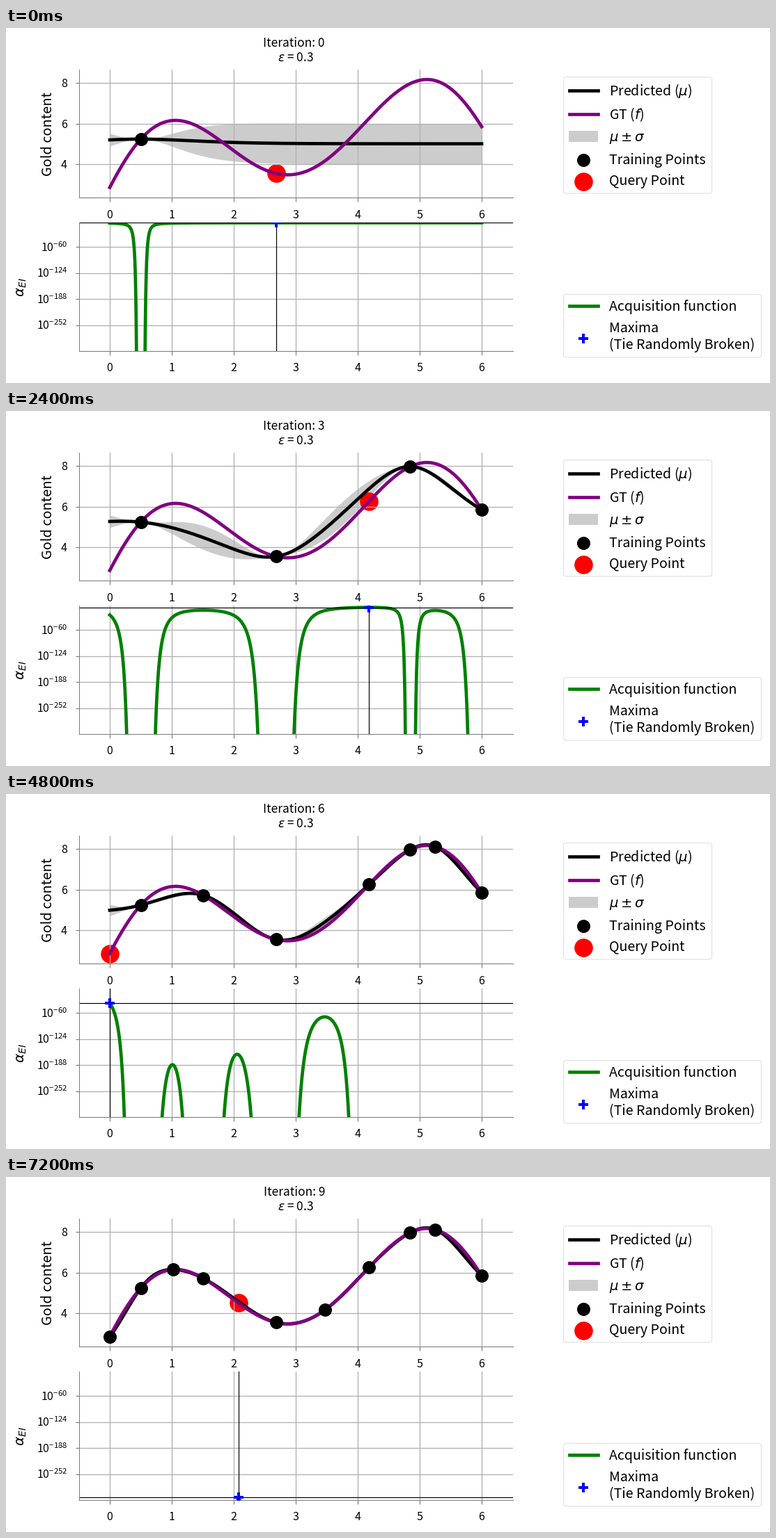
A matplotlib script for the animation above (8 s loop, 1097 by 511 pixels).

```python
import math

import numpy as np
import matplotlib.pyplot as plt
from matplotlib.animation import FuncAnimation
from matplotlib.patches import FancyBboxPatch, Rectangle

W, H, DPI = 1097, 511, 72  # at 72 dpi one point is one pixel
plt.rcParams.update({
    "font.family": ["Noto Sans CJK JP", "DejaVu Sans"],
    "mathtext.fontset": "dejavusans",
    "axes.unicode_minus": False,
})

PRIOR_MEAN, EPS = 5.0, 0.3
START = 0.5
QUERIES = [2.685, 6.0, 4.848, 4.18, 1.506, 5.247, 0.0, 3.472, 1.022, 2.073]

# Smooth ground truth fitted through a few known values
KNOTS = np.array([
    (0, 2.84), (0.5, 5.246), (1.022, 6.138), (1.07, 6.15), (1.506, 5.723),
    (2.073, 4.509), (2.685, 3.524), (2.88, 3.475), (3.472, 4.142),
    (4.18, 6.258), (4.848, 7.974), (5.12, 8.17), (5.247, 8.125), (6, 5.847),
])
truth = np.poly1d(np.polyfit(KNOTS[:, 0], KNOTS[:, 1], 6))
grid = np.linspace(0, 6, 1201)


def matern(a, b):
    s = math.sqrt(5) * np.abs(np.subtract.outer(a, b))
    return (1 + s + s ** 2 / 3) * np.exp(-s)


def predict(train, x):
    """Posterior mean and spread (variance) of the process at x."""
    cross = matern(train, x)
    weights = np.linalg.solve(matern(train, train), cross)
    mean = PRIOR_MEAN + weights.T @ (truth(train) - PRIOR_MEAN)
    spread = 1 - np.sum(cross * weights, axis=0)
    return mean, np.maximum(spread, 1e-6)


def log_tail(z):
    """log10 of pdf(z) + z * cdf(z), stable for very negative z."""
    log_pdf = -z * z / 2 - 0.5 * math.log(2 * math.pi)
    if z < -6:
        q = 1 / (z * z)
        rest = math.log(q * (1 - 3 * q + 15 * q ** 2 - 105 * q ** 3))
        return (log_pdf + rest) / math.log(10)
    cdf = 0.5 * math.erfc(-z / math.sqrt(2))
    return math.log10(math.exp(log_pdf) + z * cdf)


def log_improvement(train, x):
    mean, spread = predict(train, x)
    z = (mean - truth(train).max() - EPS) / spread
    log_ei = np.log10(spread) + np.array([log_tail(v) for v in z])
    return np.maximum(log_ei, -3000)


fig = plt.figure(figsize=((W + 0.01) / DPI, (H + 0.01) / DPI), dpi=DPI,
                 facecolor="white")

# Page layer in pixel coordinates, y pointing down
page = fig.add_axes([0, 0, 1, 1])
page.set(xlim=(0, W), ylim=(H, 0))
page.axis("off")


def label(x, y, text, size, ha="left", **kw):
    return page.text(x, y, text, fontsize=size, ha=ha, va="baseline", **kw)


def panel(top, height, ylim, yticks):
    left, width = 104.5, 623
    ax = fig.add_axes([left / W, 1 - (top + height) / H, width / W, height / H])
    ax.set(xlim=(-0.5, 6.5), ylim=ylim, xticks=range(7), yticks=yticks)
    ax.patch.set_visible(False)
    ax.grid(color="#b0b0b0", lw=1.3)
    ax.tick_params(length=5.5, width=1.2, color="gray",
                   labelleft=False, labelbottom=False)
    ax.spines[["top", "right"]].set_visible(False)
    for side in ("left", "bottom"):
        ax.spines[side].set(color="gray", linewidth=1.1)
    for i in range(7):
        label(149 + 89 * i, top + height + 29.3, str(i), 16, "center")
    return ax


top_ax = panel(59.7, 184.5, (2.34, 8.67), [4, 6, 8])
low_ax = panel(280, 185, (-315.2, 0), [-252, -188, -124, -60])

for v, y in zip((8, 6, 4), (85, 143.5, 201.8)):
    label(88, y, str(v), 16, "right")
for i in range(4):
    exponent = 60 + 64 * i
    label(88, 321.6 + 37.55 * i,
          rf"$\mathdefault{{10^{{-{exponent}}}}}$", 16, "right")

side = dict(rotation=90, rotation_mode="anchor")
label(66, 152.5, "Gold content", 20, "center", **side)
label(27, 373, r"$\alpha_{EI}$", 20, "center", **side)
title = label(413.7, 27.3, "", 17.3, "center")
label(415.7, 48, r"$\varepsilon$ = 0.3", 17.3, "center")


# Legends
LINE, DOT, BIG, PLUS = 4.7, 19, 26.6, 13.6


def legend_box(x, y, w, h):
    page.add_patch(FancyBboxPatch(
        (x, y), w, h, boxstyle="round,pad=0,rounding_size=4",
        fc="white", ec="#e4e4e4", lw=1.3))


def legend_line(y, color):
    page.plot([808.5, 849.5], [y, y], color=color, lw=LINE)


def legend_marker(y, marker, color, size):
    page.plot(828.7, y, marker, color=color, ms=size, mew=0)


legend_box(800.5, 70.5, 213, 167.5)
legend_line(89.7, "black")
legend_line(124, "purple")
page.add_patch(Rectangle((808, 148.5), 42, 15.5, fc="#cccccc", lw=0))
legend_marker(190.2, "o", "black", DOT)
legend_marker(220.7, "o", "red", BIG)

legend_box(800.5, 383.5, 284, 90.5)
legend_line(400.3, "green")
legend_marker(446.6, "P", "blue", PLUS)

for y, text in (
    (96.7, r"Predicted ($\mu$)"), (131, "GT ($f$)"),
    (163, r"$\mu \pm \sigma$"), (195.8, "Training Points"),
    (226.2, "Query Point"), (407.2, "Acquisition function"),
    (438.2, "Maxima"), (461.6, "(Tie Randomly Broken)"),
):
    label(865.5, y, text, 19.6)


# Moving parts
band = top_ax.fill_between(grid, grid, grid, color="#cccccc", lw=0, zorder=1)
query_dot, = top_ax.plot([], [], "o", color="red", ms=BIG, mew=0, zorder=1.2)
mean_line, = top_ax.plot([], [], color="black", lw=LINE, zorder=2)
top_ax.plot(grid, truth(grid), color="purple", lw=LINE, zorder=2.1)
train_dots, = top_ax.plot([], [], "o", color="black", ms=DOT, mew=0, zorder=3)

ei_line, = low_ax.plot([], [], color="green", lw=LINE, zorder=2)
v_line = low_ax.axvline(0, color="black", lw=1.2, zorder=2.1)
h_line = low_ax.axhline(0, color="black", lw=1.2, zorder=2.1)
peak, = low_ax.plot([], [], "P", color="blue", ms=PLUS, mew=0, zorder=3)


def update(step):
    train = np.array([START] + QUERIES[:step])
    query = QUERIES[step]
    mean, spread = predict(train, grid)

    title.set_text(f"Iteration: {step}")
    upper = np.column_stack([grid, mean + spread])
    lower = np.column_stack([grid, mean - spread])
    band.set_verts([np.vstack([upper, lower[::-1]])])
    mean_line.set_data(grid, mean)
    train_dots.set_data(train, truth(train))
    query_dot.set_data([query], [truth(query)])

    best = log_improvement(train, np.array([query]))[0]
    best = max(best, -308.5)  # smallest normal float
    ei_line.set_data(grid, log_improvement(train, grid))
    v_line.set_xdata([query, query])
    h_line.set_ydata([best, best])
    peak.set_data([query], [best])
    return (title, band, mean_line, train_dots, query_dot,
            ei_line, v_line, h_line, peak)


anim = FuncAnimation(fig, update, frames=len(QUERIES), interval=800,
                     repeat=True, repeat_delay=0, blit=False)
plt.show()
```
